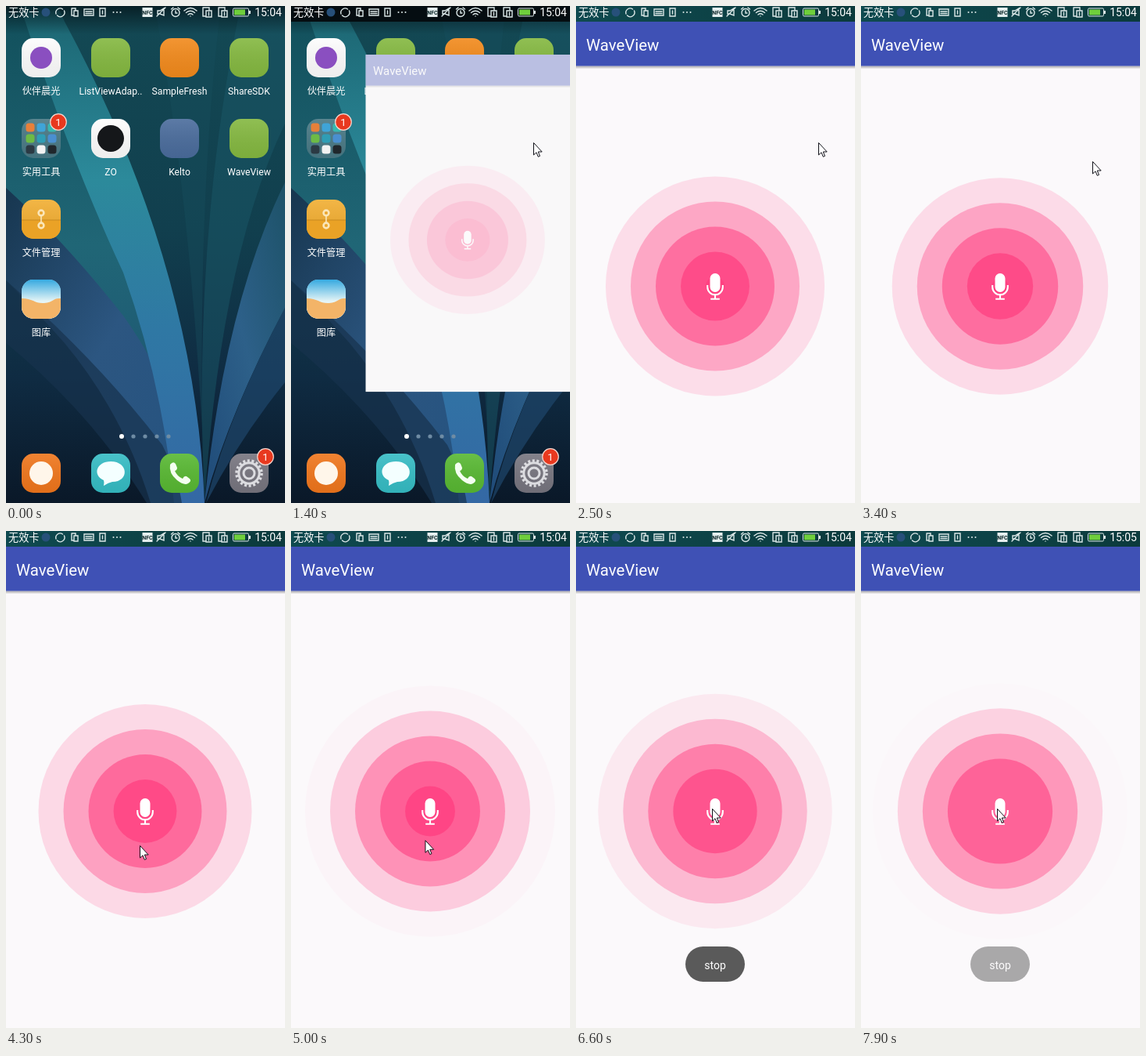
Write an HTML page that moves like this. It is 357x634 px and loops after 8 s.

```html
<!DOCTYPE html>
<html lang="zh">
<head>
<meta charset="utf-8">
<title>WaveView</title>
<style>
  html, body { margin: 0; width: 100%; height: 100%; overflow: hidden; background: #0c1c2e; }
  svg { display: block; width: 100vw; height: 100vh; }
  text { font-family: Roboto, "Noto Sans CJK SC", "Noto Sans CJK", sans-serif; fill: #fff; }
  .label { font-size: 12.2px; text-anchor: middle; }
  .line { fill: none; stroke: #dce8e8; stroke-width: 1.4; stroke-linecap: round; }
</style>
</head>
<body>
<svg viewBox="0 0 357 634" preserveAspectRatio="none">
  <defs>
    <linearGradient id="sky" x1="0" y1="0" x2="0" y2="1">
      <stop offset="0" stop-color="#134954"/><stop offset=".45" stop-color="#113f4e"/>
      <stop offset=".75" stop-color="#0f2b42"/><stop offset="1" stop-color="#0a1828"/>
    </linearGradient>
    <linearGradient id="leafLeft" x1="0" y1="0" x2="0" y2="1">
      <stop offset="0" stop-color="#12505c"/><stop offset=".5" stop-color="#206676"/><stop offset="1" stop-color="#1d4f72"/>
    </linearGradient>
    <linearGradient id="leafMain" x1="0" y1="0" x2="0" y2="1">
      <stop offset="0" stop-color="#1b6470"/><stop offset=".35" stop-color="#2c8a9b"/>
      <stop offset=".65" stop-color="#2f78a4"/><stop offset="1" stop-color="#3468a4"/>
    </linearGradient>
    <linearGradient id="leafLow" x1="0" y1="0" x2="1" y2="1">
      <stop offset="0" stop-color="#17364f"/><stop offset=".5" stop-color="#2c5681"/><stop offset="1" stop-color="#24527f"/>
    </linearGradient>
    <linearGradient id="leafRight" x1="1" y1="0" x2="0" y2="1">
      <stop offset="0" stop-color="#1d5268"/><stop offset=".5" stop-color="#2d6089"/><stop offset="1" stop-color="#1f4a78"/>
    </linearGradient>
    <linearGradient id="dark" x1="0" y1="0" x2="0" y2="1">
      <stop offset="0" stop-color="#020a0e" stop-opacity=".65"/><stop offset="1" stop-color="#020a0e" stop-opacity="0"/>
    </linearGradient>
    <linearGradient id="tint"><stop offset="0" stop-color="#0f4a50"/><stop offset="1" stop-color="#0b3a3c"/></linearGradient>
    <linearGradient id="shade" x1="0" y1="0" x2="0" y2="1">
      <stop offset="0" stop-color="#555" stop-opacity=".5"/><stop offset="1" stop-color="#555" stop-opacity="0"/>
    </linearGradient>
    <linearGradient id="air" x1="0" y1="0" x2="0" y2="1">
      <stop offset="0" stop-color="#35a9e0"/><stop offset=".55" stop-color="#e4f4f6"/>
    </linearGradient>
    <linearGradient id="gloss" x1="0" y1="0" x2="0" y2="1">
      <stop offset="0" stop-color="#fff" stop-opacity=".1"/><stop offset="1" stop-color="#000" stop-opacity=".06"/>
    </linearGradient>
    <clipPath id="tileClip"><rect x="-25" y="-25" width="50" height="50" rx="15"/></clipPath>
  </defs>

  <g id="wallpaper">
    <path fill="url(#sky)" d="M0 0H357V634H0Z"/>
    <path fill="#184f5e" opacity=".4" d="M190 0H275Q245 250 252 560Q235 240 190 0Z"/>
    <path fill="#1b5868" opacity=".5" d="M300 0H357V150Q275 320 254 634Q238 300 300 0Z"/>
    <path fill="url(#leafLeft)" d="M0 10H60Q190 290 250 600Q150 400 0 235Z"/>
    <path fill="url(#leafLow)" d="M0 232Q75 300 150 395Q225 500 250 634H185Q150 520 75 430Q30 380 0 350Z"/>
    <path fill="url(#leafMain)" d="M66 0L75 20Q242 330 254 634H215Q200 480 150 340Q82 195 18 0Z"/>
    <path fill="#17324d" opacity=".7" d="M0 350Q120 455 200 560Q220 600 225 634H180Q110 520 0 430Z"/>
    <path fill="url(#leafRight)" d="M357 225Q280 380 254 634Q285 520 357 385Z"/>
    <path fill="#1f466c" opacity=".7" d="M357 385Q285 520 256 634Q300 550 357 480Z"/>
    <rect width="357" height="36" fill="url(#dark)"/>
  </g>
  <g id="home"></g>
  <rect id="blackBar" width="357" height="20" fill="#050d11"/>
  <rect id="tintBar" width="357" height="20" fill="url(#tint)"/>

  <g id="app">
    <rect y="20" width="357" height="614" fill="#f9f8f9"/>
    <g id="content">
      <rect y="20" width="357" height="614" fill="#fbf9fb"/>
      <rect y="76.500" width="357" height="4" fill="url(#shade)"/>
      <rect y="20" width="357" height="56.500" fill="#3f51b5"/>
      <text x="13" y="56.5" font-size="20.4">WaveView</text>
      <g id="rings" fill="#ff4081"></g>
      <rect x="171.5" y="341" width="13" height="24" rx="6.5" fill="#fff"/>
      <path d="M168.2 356V358.5A9.8 9.8 0 0 0 187.8 358.5V356M178 368V373.5M172.2 373.7H183.8" fill="none" stroke="#fff" stroke-width="2.1"/>
    </g>
  </g>

  <g id="status">
    <text x="3" y="13" font-size="13.2">无效卡</text>
    <circle cx="51" cy="8" r="5.5" fill="#27507a"/>
    <path class="line" d="M64 10A5.5 5.5 0 0 1 72.5 4M74.500 6A5.500 5.500 0 0 1 65.500 12"/>
    <path class="line" d="M84 3H89V6M84 3V12H86M87 6H92V13H87Z"/>
    <path class="line" d="M100 4H112V12H100ZM102 7H110M102 9.500H110" stroke-dasharray="9 .6"/>
    <path class="line" d="M120 3H127V13H120ZM123.500 6V10"/>
    <path class="line" style="stroke-width:2" stroke-dasharray="0 4.5" d="M137.500 8H147"/>
    <rect x="174.500" y="2" width="13" height="12" fill="#e4eeee"/>
    <text x="181" y="11" font-size="7" font-weight="700" text-anchor="middle" style="fill:#0a2528">NFC</text>
    <path class="line" d="M194 6H197L202 3V12L197 10H194ZM193 13L204 2"/>
    <path class="line" d="M212 8.500A5 5 0 1 0 222 8.500A5 5 0 1 0 212 8.500M217 6V9H219M211.500 4L214 2M222.500 4L220 2"/>
    <path class="line" d="M228 6Q236 -1 244 6M230.500 8.500Q236 4 241.500 8.500M233 11Q236 8.500 239 11M236 13V13"/>
    <path id="sim" class="line" d="M252 2H260V5M252 2V13H255M256 6H263V14H256ZM259.500 8V12"/>
    <use href="#sim" x="20"/>
    <rect x="290.500" y="3" width="20" height="10" rx="1.500" fill="none" stroke="#dce8e8"/>
    <path fill="#dce8e8" d="M311 6H313V10H311Z"/>
    <path fill="#6fce3c" d="M292 4.500H306V11.500H292Z"/>
    <text id="clock" x="353" y="13" font-size="14" text-anchor="end">15:04</text>
  </g>

  <g id="toast">
    <rect x="140" y="530" width="76" height="45" rx="22.500" fill="#323232" fill-opacity=".8"/>
    <text x="178" y="559" font-size="14" text-anchor="middle">stop</text>
  </g>
  <path id="cursor" d="M.5 .5V16L4 12.800L6.300 18.300L8.500 17.400L6.300 12H11.200Z" fill="#fff" stroke="#101018"/>
</svg>

<script>
const $ = id => document.getElementById(id);
const LOOP = 8000, STEP = 100;
const clamp = x => Math.max(0, Math.min(1, x));
const span = (t, from, length) => clamp((t - from) / length);
const mix = (a, b, p) => a + (b - a) * p;

// Home screen
const COLS = [45, 134, 222, 311];
const ROWS = [66, 169, 272, 374];
const DOCK = 596;

const disc = (color, r) => `<circle r="${r}" fill="${color}"/>`;
const folderColors = ['#e8803a', '#3fa4d8', '#38b8b0', '#6dbb45', '#2f9db5', '#4a8fd0', '#2b3a44', '#f2f2f2', '#20272c'];
const folder = folderColors.map((c, i) =>
  `<rect x="${-19.5 + i % 3 * 14}" y="${-19.5 + Math.floor(i / 3) * 14}" width="11" height="11" rx="3.5" fill="${c}"/>`).join('');
const binder = `<path d="M-25 1H25V25H-25Z" fill="#eaa226"/><path d="M-25 1H25" stroke="#c98a20"/>
  <path d="M0 -8V8" stroke="#fbe6b8" stroke-width="1.600"/>
  <g fill="#eaa52e" stroke="#fbe6b8" stroke-width="2.600"><circle cy="-8" r="3.400"/><circle cy="8" r="3.400"/></g>`;
const dunes = `<path d="M-25 -25H25V25H-25Z" fill="url(#air)"/>
  <path d="M-25 -1C-10 -1 -8 6 4 5S15 -2 25 -1V25H-25Z" fill="#f3b468"/>`;
const bubble = `<path d="M0 -15C23 -15 24 11 2 11Q-3 12 -9 16Q-8 12 -9 9C-24 2 -18 -15 0 -15Z" fill="#f4ffff"/>`;
const handset = `<path d="M-12 -11Q-8 -16 -5 -12L-3 -7Q-3 -4 -6 -3Q-3 4 4 7Q6 3 9 4L13 7Q16 10 11 13Q6 16 -3 9Q-14 0 -12 -11Z" fill="#f4fff0"/>`;
const gear = `<g fill="none" stroke="#dcdce0"><circle r="16" stroke-width="3.500" stroke-dasharray="3 2.590"/>
  <circle r="13.200" stroke-width="3"/><circle r="7" stroke-width="3"/></g>`;

function tile(x, y, color, art, label = '') {
  return `<g transform="translate(${x} ${y})"><g clip-path="url(#tileClip)">
    <path d="M-25 -25H25V25H-25Z" fill="${color}"/><path d="M-25 -25H25V25H-25Z" fill="url(#gloss)"/>${art}</g>
    <text class="label" y="46.500">${label}</text></g>`;
}
const badge = (x, y) => `<circle cx="${x}" cy="${y}" r="10.300" fill="#e8391f" stroke="#f6d8d0" stroke-width="1.200"/>
  <text x="${x}" y="${y + 4.6}" font-size="13" text-anchor="middle">1</text>`;

const apps = [
  [0, 0, '#fdfdfd', disc('#8a4fc0', 14), '伙伴晨光'],
  [1, 0, '#84b840', '', 'ListViewAdap..'],
  [2, 0, '#f28a1c', '', 'SampleFresh'],
  [3, 0, '#84b840', '', 'ShareSDK'],
  [0, 1, 'rgba(120,150,160,.5)', folder, '实用工具'],
  [1, 1, '#fdfdfd', disc('#15171a', 17), 'ZO'],
  [2, 1, '#4a6c9c', '', 'Kelto'],
  [3, 1, '#84b840', '', 'WaveView'],
  [0, 2, '#f2ae32', binder, '文件管理'],
  [0, 3, '#8fd0ea', dunes, '图库'],
];
const dock = [['#f0761c', disc('#fff6ea', 15)], ['#35bcc4', bubble], ['#58b832', handset], ['#77757f', gear]];
const pages = [148, 163, 178, 193, 208].map((x, i) =>
  `<circle cx="${x}" cy="549" r="${i ? 2.6 : 3}" fill="${i ? '#6f8ca4' : '#fff'}"/>`).join('');

$('home').innerHTML =
  apps.map(([c, r, ...rest]) => tile(COLS[c], ROWS[r], ...rest)).join('') +
  dock.map(([color, art], i) => tile(COLS[i], DOCK, color, art)).join('') +
  badge(67, 148) + badge(332, 575) + pages;

// Waves: a ring is born every PERIOD, grows evenly and fades out near MAX_R
const MAX_R = 168, LIFE = 5000, PERIOD = 953, FADE = 1.02;
const LAST_BIRTH = 5003, FREEZE = 7000, RINGS = 12;
const rings = Array.from({ length: RINGS }, () => {
  const ring = document.createElementNS('http://www.w3.org/2000/svg', 'circle');
  ring.setAttribute('cx', 178);
  ring.setAttribute('cy', 357.5);
  return $('rings').appendChild(ring);
});

function drawWaves(t) {
  const now = Math.min(t, FREEZE);
  rings.forEach((ring, i) => {
    const birth = LAST_BIRTH - (RINGS - 1 - i) * PERIOD;
    const age = span(now, birth, LIFE);
    ring.setAttribute('r', age * MAX_R);
    ring.setAttribute('opacity', clamp(1 - age * FADE));
  });
}

function drawWindow(t) {
  const p = 1 - (1 - span(t, 1050, 820)) ** 2;
  const left = mix(291, 0, p), top = mix(148, 20, p), bottom = mix(202, 634, p);
  const sx = (357 - left) / 357, sy = (bottom - top) / 614;
  $('app').setAttribute('transform', `translate(${left} ${top}) scale(${sx} ${sy}) translate(0 -20)`);
  $('app').setAttribute('opacity', span(t, 1050, 150));
  $('content').setAttribute('opacity', span(t, 1250, 450));
  $('blackBar').setAttribute('opacity', span(t, 1050, 200));
  $('tintBar').setAttribute('opacity', span(t, 1450, 400));
}

// Pointer stops: time, x, y
const stops = [
  [300, 352, 112], [700, 310, 174], [2800, 310, 174], [3400, 296, 198], [3700, 280, 224],
  [4300, 171, 401], [4900, 171, 401], [5600, 174, 354], [LOOP, 174, 354],
];

function drawCursor(t) {
  const shown = t >= stops[0][0];
  $('cursor').setAttribute('visibility', shown ? 'visible' : 'hidden');
  if (!shown) return;
  const i = stops.findIndex(s => s[0] > t);
  const [a, b] = [stops[i - 1], stops[i]];
  const p = (t - a[0]) / (b[0] - a[0]);
  $('cursor').setAttribute('transform', `translate(${mix(a[1], b[1], p)} ${mix(a[2], b[2], p)})`);
}

function drawToast(t) {
  const fadeIn = 1 - (1 - span(t, 5750, 500)) ** 2;
  const fadeOut = 1 - span(t, 7550, 500) ** 2;
  $('toast').setAttribute('opacity', Math.min(fadeIn, fadeOut));
}

function frame() {
  const t = Math.floor(performance.now() % LOOP / STEP) * STEP;
  drawWindow(t);
  drawWaves(t);
  drawCursor(t);
  drawToast(t);
  $('clock').textContent = t < 7600 ? '15:04' : '15:05';
  requestAnimationFrame(frame);
}
frame();
</script>
</body>
</html>
```
